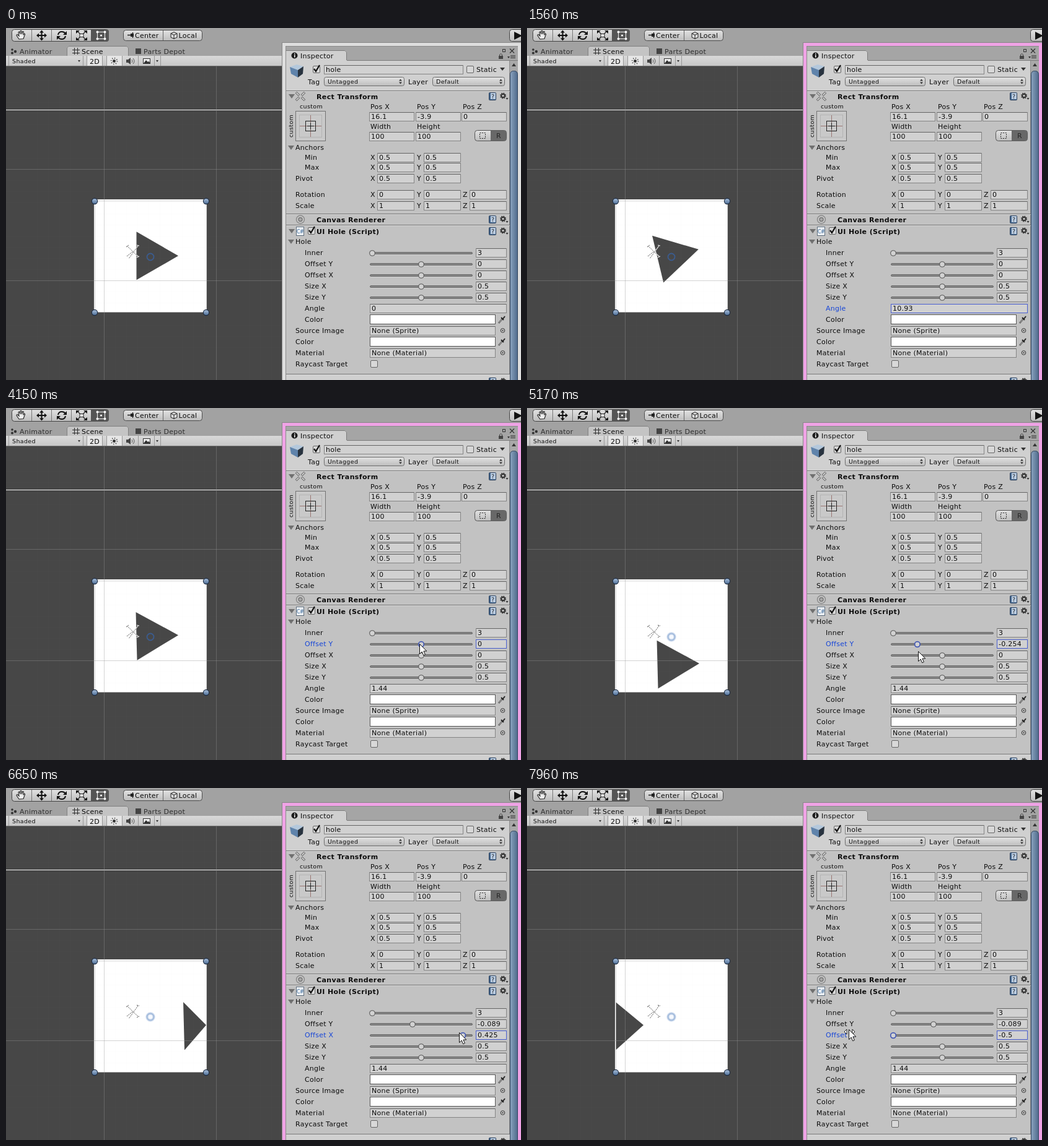
These frames come from a looping animation (831 by 569 pixels, 8000 ms). An HTML page:

```html
<!DOCTYPE html>
<html lang="en">
<head>
<meta charset="utf-8">
<title>Hole inspector</title>
<style>
html, body { margin: 0; width: 100%; height: 100%; overflow: hidden; background: #a2a2a2; }
svg { display: block; width: 831px; height: 569px; }
text { font: 11px "DejaVu Sans", sans-serif; letter-spacing: .25px; fill: #0c0c0c; white-space: pre; }
.b { font-weight: bold; letter-spacing: .37px; }
.s { font-size: 9.5px; letter-spacing: .35px; }
.dim { fill: #2e2e2e; }
</style>
</head>
<body>
<svg id="stage" viewBox="0 0 831 569">
  <defs>
    <linearGradient id="btn" x2="0" y2="1"><stop stop-color="#e2e2e2"/><stop offset="1" stop-color="#bdbdbd"/></linearGradient>
    <linearGradient id="bar" x2="0" y2="1"><stop stop-color="#d9d9d9"/><stop offset="1" stop-color="#c6c6c6"/></linearGradient>
    <linearGradient id="knob" x2="0" y2="1"><stop stop-color="#a9c0dc"/><stop offset="1" stop-color="#4d6d95"/></linearGradient>
    <linearGradient id="thumb"><stop stop-color="#8aa3bf"/><stop offset="1" stop-color="#4f6a8b"/></linearGradient>
    <clipPath id="cut"><path id="cutPath"/></clipPath>
  </defs>
  <g id="ui"></g>
  <g id="cursor">
    <path id="arrows" d="M-3 0v8l-4-4zM6 0v8l4-4z" fill="#fff" stroke="#222"/>
    <path d="M.5 .5V16.5L4.2 13L6.7 18.8L9.4 17.6L6.9 12H11.8Z" fill="#fff" stroke="#111"/>
  </g>
</svg>
<script>
const $ = id => document.getElementById(id);
const out = [];
const add = s => out.push(s);

const rect = (x, y, w, h, fill, extra = '') => add(`<rect x="${x}" y="${y}" width="${w}" height="${h}" fill="${fill}" ${extra}/>`);
const box = (x, y, w, h, fill, stroke, extra = '') => rect(x + .5, y + .5, w - 1, h - 1, fill, `stroke="${stroke}" ${extra}`);
const path = (d, stroke, w = 1, fill = 'none', extra = '') =>
  add(`<path d="${d}" stroke="${stroke}" stroke-width="${w}" fill="${fill}" ${extra}/>`);
const solid = (d, fill) => path(d, 'none', 0, fill);
const ring = (x, y, r, fill, stroke = 'none', w = 1, extra = '') =>
  add(`<circle cx="${x}" cy="${y}" r="${r}" fill="${fill}" stroke="${stroke}" stroke-width="${w}" ${extra}/>`);
const text = (x, y, s, cls = '', extra = '') => add(`<text x="${x}" y="${y}" class="${cls}" ${extra}>${s}</text>`);

function field(x, cy, w, s = '', id = '') {
  box(x, cy - 7, w, 15, '#d1d1d1', '#858585', id && `id="${id}Box"`);
  rect(x + 1, cy - 7, w - 2, 1, '#646464', id && `id="${id}Top"`);
  text(x + 3, cy + 4, s, '', id && `id="${id}Val"`);
}
function check(x, y, on) {
  box(x, y, 12, 12, '#d8d8d8', '#666', 'rx="1.5"');
  if (on) path(`M${x + 2} ${y + 5}l3 4 6-10`, '#111', 2.3);
}
const fold = (x, y) => solid(`M${x} ${y}h10l-5 7z`, '#707070');
const drop = (x, y, k = 3) => solid(`M${x - k} ${y}h${2 * k}l-${k} ${k + 1}z`, '#333');
function popup(x, w, s) {
  box(x, 79, w, 15, 'url(#btn)', '#6c6c6c', 'rx="3"');
  text(x + 6, 90, s, 's');
  solid(`M${x + w - 9} 85.5h5l-2.5-3zM${x + w - 9} 87.5h5l-2.5 3z`, '#333');
}
function vector(cy, vals) {
  vals.forEach((v, i) => {
    const x = 588 + Math.round(i * 74.6);
    text(x, cy + 4, 'XYZ'[i]);
    field(x + 11, cy, 60, v);
  });
}
function helpIcons(y) {
  box(779, y - 6, 12, 13, '#46688f', '#2a3f5b', 'rx="1"');
  rect(782, y - 5, 8, 10, '#b9cbe0');
  text(783, y + 4, '?', 's', 'fill-opacity=".85"');
  ring(802, y - .5, 2.8, 'none', '#333', 2);
  ring(802, y - .5, 4.2, 'none', '#333', 1.6, 'stroke-dasharray="1.65 1.65"');
  drop(808.5, y + 3, 2);
}
function slider(cy, name, label, v, x = 670) {
  text(482, cy + 4, label, '', `id="${name}Label"`);
  box(587, cy - 1, 166, 4, '#858585', '#6c6c6c', 'rx="1.5"');
  rect(588, cy + 3, 164, 1, '#d4d4d4');
  ring(x, cy + 1, 4.3, '#d2d2d2', '#555', 1.1, `id="${name}Thumb"`);
  field(758, cy, 50, v, name);
}
function separator(y) {
  rect(452, y, 361, 1, '#777');
  rect(452, y + 1, 361, 1, '#d6d6d6');
}
function dropper(y) {
  path(`M795 ${y + 6}l6-7`, '#333', 2.2);
  path(`M795.5 ${y + 5.5}l5-6`, '#ddd', 1);
  path(`M799 ${y - 3}l4 4M802 ${y - 1}l3-4`, '#222', 1.9);
}

function sceneView() {
  rect(0, 62, 446, 507, '#474747');
  for (let i = -9; i < 17; i++) {
    rect(158 + i * 18, 62, 1, 507, '#999', 'opacity=".012"');
    rect(0, 228 + i * 18, 446, 1, '#999', 'opacity=".012"');
  }
  rect(0, 132, 446, 1, '#f2f2f2');
  rect(142, 277, 182, 182, '#fff');
  const star = 'M195 352l19 18M213 352l-15 21M194 354l4-3M211 351l4 1M211 371l4-2M195 369l10-8';
  path(star, '#555', 1, 'none', 'stroke-dasharray="2 1.2"');
  ring(233, 370, 5.5, '#f6f9fe', '#d3dff0', 4.5);
  ring(233, 370, 5.5, 'none', '#a3bbdc', 2);
  add('<g clip-path="url(#cut)">');
  rect(142, 277, 182, 183, '#474747');
  path(star, '#e8e8e8', 1.2);
  ring(233, 370, 5.5, 'none', '#3a5c90', 1.8);
  add('</g>');
  for (let i = 1; i < 10; i++) {
    rect(158 + i * 18, 278, 1, 181, '#999', 'opacity=".025"');
    rect(143, 282 + i * 18, 181, 1, '#999', 'opacity=".025"');
  }
  box(143, 279, 181, 181, 'none', '#c4c4c4', 'stroke-opacity=".75"');
  for (const x of [158, 339]) rect(x, 62, 1, 507, '#939393', 'opacity=".4"');
  for (const y of [228, 408]) rect(0, y, 446, 1, '#939393', 'opacity=".4"');
  for (const x of [143, 323]) for (const y of [280, 460]) ring(x, y, 4.6, 'url(#knob)', '#1c2b40', 1.1);
}

function toolbars() {
  rect(0, 0, 831, 62, '#a2a2a2');
  box(9, 2, 157, 20, 'url(#btn)', '#444', 'rx="4"');
  for (const x of [41, 73, 105]) rect(x, 3, 1, 18, '#777');
  solid('M137 2.500H162q4 0 4 4V18q0 4 -4 4H137z', '#555');
  path('M21 18l-4-6q0-2 2-1l2 2-1-6q1-2 2 0l1 3 0-5q1.500-1.500 2 0l.5 5 1-4q1.500-1 2 .5l-.5 5 1-2q2-.5 1.500 1l-2.500 7z', '#222', 1.1, '#eee');
  path('M51 12h13M57.500 5v14', '#111', 2);
  solid('M49 12l4-3.500v7zM66 12l-4-3.500v7zM57.500 3.500l-3.500 4h7zM57.500 20.500l-3.500-4h7z', '#111');
  path('M84 11q1-5 6-5 4 0 6 3M96 13q-1 5-6 5-4 0-6-3', '#111', 2);
  solid('M98 5v6h-6zM82 19v-6h6z', '#111');
  path('M116 6l12 12M128 6l-12 12', '#222', 1.3);
  solid('M113 4h6l-6 5zM131 4h-6l6 5zM113 20h6l-6-5zM131 20h-6l6-5z', '#111');
  rect(119, 9.5, 6, 5, '#eee', 'stroke="#222"');
  box(147, 6, 13, 12, 'none', '#eee');
  for (const x of [147.5, 159.5]) for (const y of [6.5, 17.5]) ring(x, y, 1.9, '#fff');
  ring(153.5, 12, 1.6, '#fff');

  box(189, 3, 128, 18, 'url(#btn)', '#4c4c4c', 'rx="4"');
  rect(253, 4, 1, 16, '#666');
  path('M196 11.500h7M204.500 7v9', '#222', 1.4);
  rect(201, 9, 5, 5, '#222');
  text(208, 16, 'Center');
  path('M266 9l5-2.500 5 2.500v6l-5 2.500-5-2.500zM266 9l5 2.500 5-2.500M271 11.500v6', '#333', 1.1, '#ddd');
  text(278.5, 16, 'Local');
  box(812, 2, 26, 20, 'url(#btn)', '#444', 'rx="4"');
  solid('M820 6v13l13-6.500z', '#111');

  solid('M98 46V33q0-4 4-4H194q4 0 4 4V46z', '#c4c4c4');
  path('M98.500 46V33q0-3.500 3.500-3.500H194q3.500 0 3.500 3.500V46', '#808080');
  ring(10, 35, 1.8, '#333'); ring(15, 38, 2.2, '#333'); ring(10, 40.5, 2, '#333');
  text(22, 42, 'Animator', 'dim');
  path('M110.500 32v11M115.500 32v11M107 35.500h12M107 40.500h12', '#333', 1.1);
  text(122, 42, 'Scene');
  rect(209, 33, 9, 9, '#444');
  text(222, 42, 'Parts Depot', 'dim');

  rect(0, 45, 446, 17, 'url(#bar)');
  rect(0, 61, 446, 1, '#6f6f6f');
  rect(130, 45, 25, 16, '#e6e6e6');
  rect(162, 45, 25, 16, '#e6e6e6');
  for (const x of [4, 124, 130, 155, 162, 187, 213, 239, 249]) rect(x, 45, 1, 16, '#989898');
  text(10, 57, 'Shaded', 's');
  drop(118, 52, 2);
  text(135, 58, '2D');
  ring(174.5, 53.5, 2.4, '#333');
  ring(174.5, 53.5, 4.8, 'none', '#333', 2, 'stroke-dasharray="1 2.77"');
  solid('M194 51h3l4-3v11l-4-3h-3z', '#444');
  path('M203 51q2 2.500 0 5M205 49q4 4.500 0 9', '#555');
  box(221, 49, 12, 9, '#eee', '#333');
  solid('M222 57l4-5 3 3 1.500-1.500 2 3.500z', '#333');
  drop(244, 52, 2);
}

function inspector() {
  rect(445, 23, 386, 546, '#888');
  rect(446, 24, 385, 545, '#dedede', 'id="frame"');
  rect(451, 29, 375, 540, '#8b8b8b');
  rect(452, 30, 374, 22, '#a5a5a5');
  rect(452, 52, 374, 517, '#c2c2c2');
  rect(452, 52, 361, 49, '#d0d0d0');
  solid('M452 53V36H546q4 0 4 4V53z', '#d0d0d0');
  path('M452 36.500H546q3.500 0 3.500 3.500V52M550 52.500H826', '#7d7d7d');
  ring(465.5, 44.5, 5, '#1c1c1c');
  rect(465, 41, 1.5, 1.5, '#fff'); rect(465, 43.5, 1.5, 4, '#fff');
  text(475, 48.5, 'Inspector');
  box(801, 34, 5, 5, 'none', '#333');
  path('M813 33.500l7 7M820 33.500l-7 7', '#333', 1.3);
  rect(795, 45, 7, 5, '#444');
  path('M796.500 45v-2q2-3 4 0v2', '#444');
  path('M814 44.500h8M814 46.500h8M814 48.500h8', '#444');
  drop(811, 46, 2);

  rect(813, 53, 13, 516, '#a9a9a9');
  rect(812, 53, 1, 516, '#8c8c8c');
  solid('M816 62h7l-3.500-5z', '#333');
  box(813, 69, 13, 520, 'url(#thumb)', '#33465f', 'rx="5"');

  solid('M458 63l11-4 11 3-9 6z', '#b4c8dc');
  solid('M458 63l13 5v12l-11-6z', '#5f83ab');
  solid('M471 68l9-6-1 12-8 6z', '#28333f');
  check(495, 61, true);
  field(513, 67, 225, 'hole');
  check(743, 61);
  text(759, 71, 'Static');
  drop(801, 64, 4);
  text(487, 91, 'Tag'); popup(513, 130, 'Untagged');
  text(649, 91, 'Layer'); popup(688, 117, 'Default');

  separator(101);
  fold(456, 107);
  path('M468 104l5 5M482 104l-5 5M468 117l5-5M482 117l-5-5', '#666', 3.6);
  path('M468.500 104.500l4 4M481.500 104.500l-4 4M468.500 116.500l4-4M481.500 116.500l-4-4', '#ddd', 1.6);
  text(501, 115, 'Rect Transform', 'b');
  helpIcons(110);
  text(474, 130, 'custom', 's');
  text(0, 0, 'custom', 's', 'transform="translate(463 177) rotate(-90)"');
  box(467, 134, 49, 49, '#c9c9c9', '#727272');
  box(473, 140, 37, 37, 'none', '#b4b4b4');
  path('M474 158.500h35M491.500 141v35', '#8a5a54', 1, 'none', 'opacity=".75"');
  box(483, 150, 17, 17, 'none', '#222');
  path('M486 158.500h11M491.500 153v11', '#222');
  [['Pos X', '16.1', 'Width', '100'], ['Pos Y', '-3.9', 'Height', '100'], ['Pos Z', '0']].forEach((c, i) => {
    const x = 586 + Math.round(i * 74.6);
    text(x + 2, 131, c[0]);
    field(x, 143, 73, c[1]);
    if (c[2]) { text(x + 2, 163, c[2]); field(x, 175, 73, c[3]); }
  });
  box(756, 165, 52, 18, 'url(#btn)', '#555', 'rx="4"');
  solid('M782 165.500H804q3.500 0 3.500 4V179q0 3.500-3.500 3.500H782z', '#686868');
  rect(764.5, 169.5, 9, 9, 'none', 'stroke="#222" stroke-dasharray="2 1.6"');
  text(791, 178, 'R', '', 'opacity=".7"');

  fold(455, 190);
  text(467, 197, 'Anchors');
  text(482, 213, 'Min'); vector(209, ['0.5', '0.5']);
  text(482, 229, 'Max'); vector(225, ['0.5', '0.5']);
  text(467, 247, 'Pivot'); vector(243, ['0.5', '0.5']);
  text(467, 273, 'Rotation'); vector(269, ['0', '0', '0']);
  text(467, 291, 'Scale'); vector(287, ['1', '1', '1']);

  separator(300);
  ring(475, 309.5, 6.5, '#c8c8c8', '#888', 1.4);
  ring(475, 309.5, 3, '#aaa', '#777', 1.4);
  text(501, 314, 'Canvas Renderer', 'b');
  helpIcons(309);

  separator(318);
  fold(456, 325);
  box(468, 321, 13, 15, '#edf1f5', '#5e6d7c');
  text(469, 332, 'C#', '', 'style="font-size:8px;letter-spacing:-.5px;fill:#3d6a9a"');
  check(487, 322, true);
  text(501, 333, 'UI Hole (Script)', 'b');
  helpIcons(328);
  fold(455, 342);
  text(467, 349, 'Hole');

  slider(363, 'inner', 'Inner', '3', 591);
  slider(381, 'offY', 'Offset Y', '0');
  slider(399, 'offX', 'Offset X', '0');
  slider(417, 'sizeX', 'Size X', '0.5');
  slider(435, 'sizeY', 'Size Y', '0.5');
  text(482, 457, 'Angle', '', 'id="angleLabel"');
  field(587, 453, 221, '0', 'angle');
  for (const [x, y] of [[482, 471], [467, 507]]) {
    text(x, y + 4, 'Color');
    box(587, y - 8, 203, 16, '#fff', '#555');
    dropper(y);
  }
  for (const [y, label, v] of [[489, 'Source Image', 'Sprite'], [525, 'Material', 'Material']]) {
    text(467, y + 4, label);
    field(587, y, 203, `None (${v})`);
    ring(801.5, y, 3.3, 'none', '#333');
    ring(801.5, y, 1.1, '#333');
  }
  text(467, 547, 'Raycast Target');
  check(588, 537);
  separator(559);
  rect(452, 561, 361, 8, '#d0d0d0');
  text(507, 577, 'Default UI Material', 'b');
  helpIcons(571);
}

sceneView();
toolbars();
inspector();
$('ui').innerHTML = out.join('');

// Keys are [time, value, ...], joined by straight lines.
function track(keys, t) {
  const i = keys.findIndex(k => k[0] > t);
  if (i === 0) return keys[0].slice(1);
  if (i < 0) return keys[keys.length - 1].slice(1);
  const a = keys[i - 1], b = keys[i], u = (t - a[0]) / (b[0] - a[0]);
  return a.slice(1).map((v, j) => v + (b[j + 1] - v) * u);
}
const angleKeys = [[610, 0], [900, .3], [1200, 2], [1400, 4.6], [1515, 10.93], [1560, 13.5], [1880, 42.8],
  [1960, 42], [2180, 9.8], [2230, 8.7], [2420, 0], [2640, -14], [2795, -12.34], [2900, -12.34], [3060, -7.9], [3300, 1.44]];
const offYKeys = [[4155, 0], [4340, -.3], [4570, -.3], [4680, -.268], [4910, -.268], [4940, -.262],
  [5090, -.262], [5170, -.254], [5870, -.089]];
const offXKeys = [[6010, 0], [6220, .19], [6370, .19], [6650, .425], [7020, -.23], [7270, -.23], [7530, -.5]];
const mouseKeys = [[210, 608, 517], [410, 485, 446], [610, 485, 446], [900, 495, 447], [1200, 530, 449],
  [1410, 600, 452], [1515, 810, 455], [1560, 896, 456], [1880, 1870, 460], [1960, 1845, 462], [2180, 774, 470],
  [2230, 735, 473], [2420, 446, 487], [2640, 22, 450], [2795, 34, 422], [2900, 34, 422], [3060, 211, 440],
  [3310, 494, 471], [3460, 494, 471], [3800, 640, 400], [4000, 667, 381], [4155, 667, 381], [4340, 623, 390],
  [4570, 623, 392], [4680, 628, 393], [5090, 629, 393], [5170, 631, 393], [5870, 657, 393], [5910, 657, 393],
  [6010, 668, 396], [6220, 698, 396], [6370, 698, 396], [6650, 731, 395], [7020, 634, 396], [7270, 634, 396],
  [7530, 563, 394], [7855, 563, 394], [7955, 519, 390]];

const CX = 233, CY = 368.3, SIZE = 180, R = 45;
const clamp = (v, mid) => Math.max(mid - SIZE / 2, Math.min(mid + SIZE / 2, v));

function setFocus(name, on) {
  $(name + 'Label').style.fill = on ? '#1746d8' : '';
  $(name + 'Box').setAttribute('stroke', on ? '#4a5fd0' : '#858585');
  $(name + 'Top').setAttribute('fill', on ? '#4a5fd0' : '#646464');
}
function setOffset(name, v, focused) {
  const thumb = $(name + 'Thumb');
  thumb.setAttribute('cx', 670 + v * 158);
  thumb.setAttribute('stroke', focused ? '#4258b4' : '#555');
  thumb.setAttribute('stroke-width', focused ? 1.7 : 1.1);
  $(name + 'Val').textContent = +v.toFixed(3);
}

function draw(t) {
  const [angle] = track(angleKeys, t), [oy] = track(offYKeys, t), [ox] = track(offXKeys, t);
  // Corners of the hole stop at the edges of the card.
  const pts = [0, 120, 240].map(d => {
    const r = (d + angle) * Math.PI / 180;
    return `${clamp(CX + ox * SIZE + R * Math.cos(r), CX)} ${clamp(CY - oy * SIZE - R * Math.sin(r), CY)}`;
  });
  $('cutPath').setAttribute('d', `M${pts.join('L')}Z`);

  const focus = t < 610 ? '' : t < 3990 ? 'angle' : t < 6005 ? 'offY' : 'offX';
  for (const n of ['angle', 'offY', 'offX']) setFocus(n, n === focus);
  $('frame').setAttribute('fill', focus ? '#f0a3e6' : '#dedede');
  setOffset('offY', oy, focus === 'offY');
  setOffset('offX', ox, focus === 'offX');
  // The inspector trails the scene view slightly while dragging.
  $('angleVal').textContent = +track(angleKeys, t - 45)[0].toFixed(2);

  const [mx, my] = track(mouseKeys, t).map(Math.round);
  $('cursor').setAttribute('transform', `translate(${mx} ${my})`);
  $('cursor').style.display = t < 210 ? 'none' : '';
  const overLabel = mx > 480 && mx < 585 && my > 354 && my < 463;
  $('arrows').style.display = overLabel ? '' : 'none';
}

let start;
function tick(now) {
  start ??= now;
  draw((now - start) % 8000);
  requestAnimationFrame(tick);
}
draw(0);
requestAnimationFrame(tick);
</script>
</body>
</html>
```
